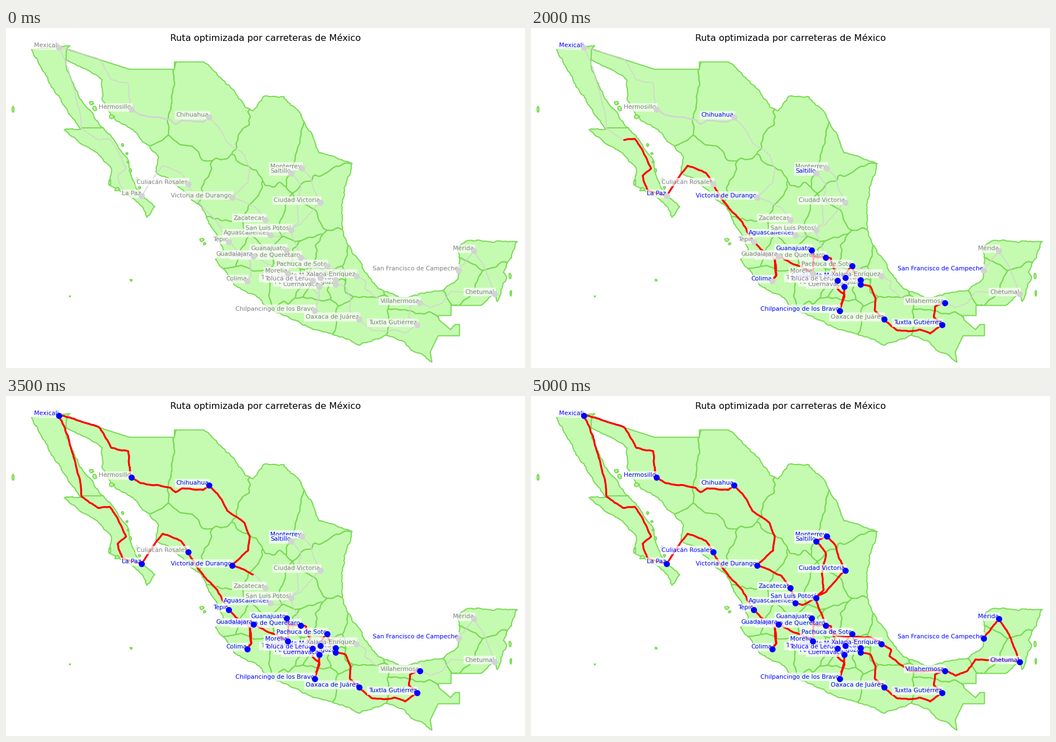
Animation, 923 px wide and 606 px high, one loop 5.1 s. Source, as a matplotlib script:

```python
import numpy as np
import matplotlib.pyplot as plt
from matplotlib.animation import FuncAnimation

W, H, DPI = 923, 606, 100
STEPS = 50
LAND, EDGE, EDGE_LW = "#c5fbb0", "#79da55", 1.45

plt.rcParams["font.family"] = "DejaVu Sans"
rng = np.random.default_rng(7)

fig = plt.figure(figsize=(W / DPI, H / DPI), dpi=DPI, facecolor="white")
ax = fig.add_axes([0, 0, 1, 1])
ax.axis("off")


def rough(pts, amp=0.4):
    """Fractal polyline through the key points."""
    out = [np.array(pts[:1], float)]
    for a, b in zip(pts, pts[1:]):
        p = np.array([a, b], float)
        while np.hypot(*np.diff(p, axis=0).T).max() > 5:
            d = np.diff(p, axis=0)
            normal = np.column_stack([-d[:, 1], d[:, 0]])
            normal /= np.sqrt(np.hypot(*d.T))[:, None]
            mid = (p[1:] + p[:-1]) / 2
            mid += normal * rng.uniform(-amp, amp, (len(d), 1))
            p = np.insert(p, range(1, len(p)), mid, axis=0)
        out.append(p[1:])
    return np.vstack(out)


def land(*parts):
    p = np.vstack(parts)
    return ax.fill(p[:, 0], p[:, 1], fc=LAND, ec=EDGE, lw=EDGE_LW,
                   joinstyle="round", zorder=1)[0]


# ---- cities in visiting order, each with the bends of the road to it ----
names, states, places, roads = [], [], [], []


def city(name, state, x, y, *via):
    names.append(name)
    states.append(state)
    start = [places[-1]] if places else []
    places.append((x, y))
    roads.append(rough([*start, *via, (x, y)], 0.2))


city("Villahermosa", "Tabasco", 735, 489)
city("Tuxtla Gutiérrez", "Chiapas", 730, 528, (718, 496), (716, 515))
city("Oaxaca de Juárez", "Oaxaca", 627, 518,
     (709, 544), (690, 537), (671, 540), (650, 538))
city("Puebla de Zaragoza", "Puebla", 585, 456, (611, 503), (612, 480), (603, 460))
city("Tlaxcala de Xicohténcatl", "Tlaxcala", 585, 448)
city("Pachuca de Soto", "Hidalgo", 570, 423, (573, 432))
city("Ciudad de México", "Ciudad de Mexico", 558, 444, (564, 431))
city("Cuernavaca", "Morelos", 556, 460)
city("Chilpancingo de los Bravo", "Guerrero", 548, 503, (557, 478))
city("Toluca de Lerdo", "Mexico", 544, 449, (557, 475), (545, 465))
city("Santiago de Querétaro", "Queretaro", 523, 408, (538, 428), (533, 410))
city("Guanajuato", "Guanajuato", 498, 395, (505, 408))
city("Morelia", "Michoacan", 500, 436, (502, 410))
city("Guadalajara", "Jalisco", 439, 406, (467, 421))
city("Colima", "Colima", 428, 450, (433, 412), (436, 440))
city("Tepic", "Nayarit", 395, 380, (436, 440), (433, 412), (408, 394))
city("Culiacán Rosales", "Sinaloa", 323, 277, (375, 345), (345, 312))
city("La Paz", "Baja California Sur", 240, 298, (311, 258), (278, 245))
city("Mexicali", "Baja California", 93, 34, (207, 289), (198, 263), (213, 250),
     (199, 220), (184, 197), (163, 199), (134, 179), (130, 145), (110, 73))
city("Hermosillo", "Sonora", 222, 144,
     (105, 36), (166, 56), (187, 92), (217, 98))
city("Chihuahua", "Chihuahua", 360, 158,
     (240, 155), (292, 163), (301, 171), (313, 164), (350, 167))
city("Victoria de Durango", "Durango", 401, 301,
     (375, 173), (393, 204), (424, 226), (433, 250), (430, 275))
city("Zacatecas", "Zacatecas", 460, 341, (445, 320))
city("Aguascalientes", "Aguascalientes", 469, 368, (467, 355))
city("San Luis Potosí", "San Luis Potosi", 506, 359, (482, 372))
city("Ciudad Victoria", "Tamaulipas", 558, 310, (525, 348), (545, 324))
city("Monterrey", "Nuevo Leon", 525, 249, (547, 288), (541, 266))
city("Saltillo", "Coahuila", 506, 258)
city("Xalapa-Enríquez", "Veracruz", 622, 441, (524, 280), (517, 314), (520, 345),
     (506, 359), (523, 408), (545, 427), (604, 430))
city("Chetumal", "Quintana Roo", 868, 473, (640, 452), (637, 463), (674, 490),
     (735, 489), (755, 498), (775, 490), (790, 469))
city("Mérida", "Yucatan", 831, 396, (850, 425))
city("San Francisco de Campeche", "Campeche", 804, 431, (814, 420))

# ---- coast and frontiers ----
rio_grande = [(351, 60), (370, 77), (403, 109), (425, 141), (439, 147), (458, 121),
              (494, 122), (522, 150), (541, 184), (556, 222), (615, 241)]
gulf = [(615, 241), (601, 285), (597, 345), (601, 372), (633, 425), (660, 462),
        (705, 480), (774, 468), (803, 447), (804, 390), (825, 378), (875, 379),
        (909, 380), (884, 435), (890, 445), (873, 487), (867, 474), (843, 494)]
guatemala = [(791, 494), (791, 512), (768, 512), (770, 520), (790, 537),
             (798, 528), (806, 528), (806, 548), (768, 548), (754, 577)]
pacific = [(757, 595), (707, 558), (676, 547), (628, 565), (572, 543), (515, 521),
           (477, 505), (445, 478), (405, 457), (372, 412), (386, 395), (373, 365),
           (345, 316), (312, 287), (266, 255), (270, 228), (250, 207), (225, 180),
           (186, 155), (170, 125), (170, 92), (140, 72), (106, 55)]
peninsula = [(106, 60), (117, 95), (135, 130), (167, 174), (187, 193), (214, 230),
             (223, 265), (240, 298), (264, 318), (250, 337), (242, 318),
             (207, 293), (183, 278), (187, 250), (162, 222), (130, 204),
             (103, 181), (132, 180), (110, 150), (80, 105), (45, 38)]

north = [(107, 37), (219, 73), (299, 73), (299, 60)]
mainland = land(north, rough(rio_grande), rough(gulf), guatemala, rough(pacific))
land(rough(peninsula), [(94, 33), (113, 31), (107, 37)])
ax.plot([134, 169], [177, 177], color=EDGE, lw=EDGE_LW, zorder=2)


def island(x, y, w, h):
    a = np.linspace(0, 2 * np.pi, 9)
    r = rng.uniform(0.3, 0.6, 9)
    land(np.column_stack([x + w * r * np.cos(a), y + h * r * np.sin(a)]))


for spot in [(12, 145, 4, 10), (113, 478, 2, 2), (222, 449, 4, 4), (347, 377, 8, 6),
             (353, 384, 4, 5), (151, 134, 8, 7), (157, 143, 8, 8), (187, 157, 10, 8),
             (197, 287, 10, 6), (184, 275, 4, 11), (896, 441, 4, 10), (897, 472, 3, 10)]:
    island(*spot)
for t in np.linspace(0, 1, 6):
    island(205 + 32 * t + rng.normal(0, 2), 208 + 76 * t, 4, rng.uniform(3, 9))

# ---- state borders: nearest seat of government on a wavy grid ----
seats = dict(zip(states, places))
seats.update({"Coahuila": (480, 215), "Nuevo Leon": (548, 235),
              "Tamaulipas": (575, 290), "Sinaloa": (300, 275)})
for state in ("Baja California", "Baja California Sur"):
    del seats[state]

gx, gy = np.meshgrid(np.arange(0, W, 2.0), np.arange(0, H, 2.0))
wx, wy = gx.copy(), gy.copy()
for size in (60, 42, 30, 21, 15):
    for warped in (wx, wy):
        turn, phase = rng.uniform(0, 2 * np.pi, 2)
        along = gx * np.cos(turn) + gy * np.sin(turn)
        warped += 0.05 * size * np.sin(2 * np.pi * along / size + phase)

dist = np.array([np.hypot(wx - x, wy - y) for x, y in seats.values()])
for k in range(len(dist)):
    others = np.delete(dist, k, axis=0).min(axis=0)
    cell = ax.contour(gx, gy, dist[k] - others, levels=[0], colors=[EDGE],
                      linewidths=EDGE_LW, zorder=2)
    cell.set_clip_path(mainland)

# pixel centres sit on whole numbers
ax.set_xlim(-0.5, W - 0.5)
ax.set_ylim(H - 0.5, -0.5)

# ---- route, measured along its length ----
route = np.vstack(roads)
length = np.concatenate([[0], np.cumsum(np.hypot(*np.diff(route, axis=0).T))])
arrival = length[np.cumsum([len(r) for r in roads]) - 1]

# pace: at these steps the head has passed this many legs
pace_steps = [0, 6, 13, 18, 20, 24, 28, 40, 48, 50]
pace_legs = [0, 5.57, 12.53, 17.15, 17.46, 17.99, 19.66, 25.33, 29, 31]
pace = np.interp(pace_legs, range(len(names)), arrival)


def road(part, lw):
    ax.plot(part[:, 0], part[:, 1], color="lightgray", alpha=0.8, lw=lw,
            solid_joinstyle="round", zorder=3)


road(route, 1.5)
road(roads[names.index("Chihuahua")], 2.2)
red, = ax.plot([], [], color="red", lw=2.4, solid_joinstyle="round",
               solid_capstyle="round", zorder=4)

# ---- labels and dots ----
box = dict(facecolor="white", edgecolor="none", alpha=0.7, pad=1.9)
labels = [ax.text(x, y, name, ha="right", fontsize=7.78, color="gray", bbox=box,
                  zorder=5) for name, (x, y) in zip(names, places)]
by_state = [labels[k] for k in np.argsort(states)]

spots = np.array(places)
dot = dict(ls="", marker="o", ms=7.8, mew=0)
ax.plot(spots[:, 0], spots[:, 1], color="lightgray", zorder=6, **dot)
visited, = ax.plot([], [], color="blue", zorder=7, **dot)

ax.text(W / 2 - 0.5, 23, "Ruta optimizada por carreteras de México", ha="center",
        fontsize=11.63, color="black", zorder=8)


def update(i):
    s = np.interp(i, pace_steps, pace)
    head = [np.interp(s, length, route[:, k]) for k in (0, 1)]
    done = np.vstack([route[length < s], head])
    red.set_data(done[:, 0], done[:, 1])
    red.set_visible(i > 0)

    n = len(names) * i // STEPS
    visited.set_data(spots[:n, 0], spots[:n, 1])
    for k, label in enumerate(by_state):
        label.set_color("blue" if k < n else "gray")
    return [red, visited, *labels]


anim = FuncAnimation(fig, update, frames=STEPS + 1, interval=100, repeat=True,
                     repeat_delay=0, blit=False)
plt.show()
```
